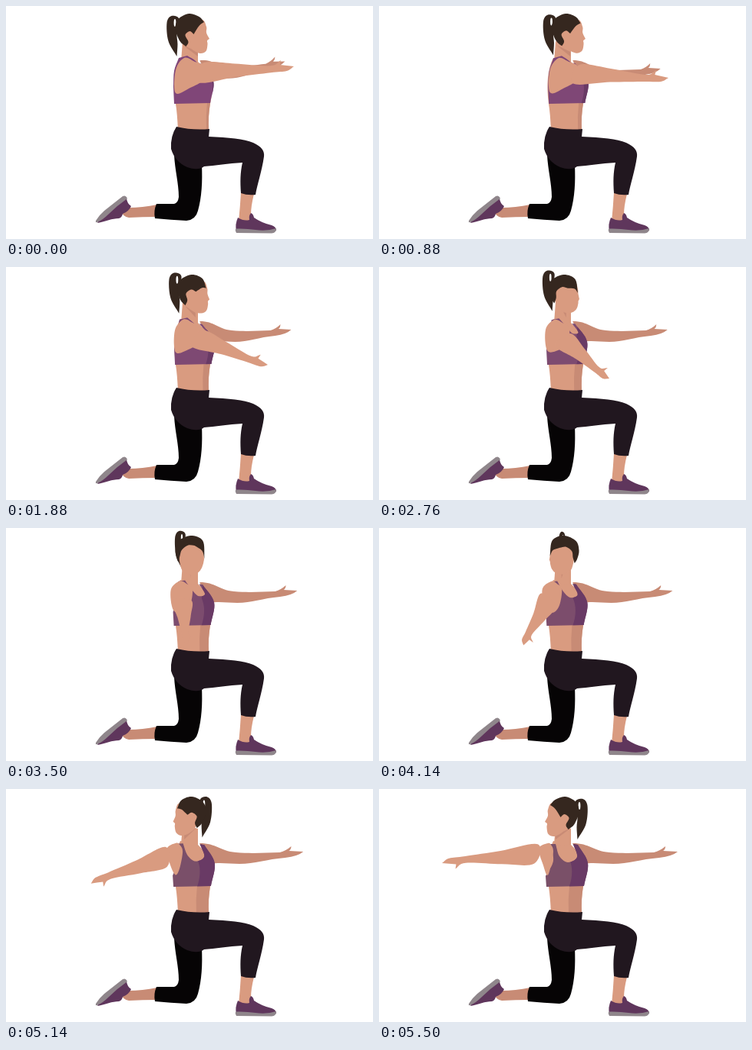
An HTML page that plays this animation: 478 by 305 pixels, repeating every 6.94 s.

```html
<!DOCTYPE html>
<html lang="en">
<head>
<meta charset="utf-8">
<title>Kneeling torso rotation</title>
<style>
html, body { margin: 0; width: 100%; height: 100%; overflow: hidden; background: #fff; }
svg { display: block; width: 100%; height: 100%; }
.skin { fill: #d99b80; }
.shade { fill: #c88b75; }
.hair { fill: #35271f; }
.shoe { fill: #5f365c; }
.sole { fill: #8f868b; }
</style>
</head>
<body>
<svg viewBox="0 0 478 305">
  <clipPath id="braClip"><use href="#bra"/></clipPath>

  <path class="shade" d="M197 260Q177 264 160 264L150 268Q152 276 160 277Q178 276 196 276Z"/>
  <path class="shoe" d="M157 252Q158 259 163 262Q160 269 152 272Q151 277 147 278C138 278 130 282 119 284C125 272 140 258 157 252Z"/>
  <path class="sole" d="M117 281Q121 274 128 268L152 249Q156 247 158 252Q145 261 133 273Q126 280 119 283Q116 284 117 281Z"/>
  <path fill="#060405" d="M219 195C220 215 225 232 225 250Q224 258 219 259L196 259Q192 268 194 278Q215 280 235 281Q247 280 250 268C255 250 256 230 255 208Z"/>
  <path class="skin" d="M306 244L323 246Q319 262 319 273L317 284L303 282Q305 262 306 244Z"/>
  <path class="shoe" d="M302 277Q310 282 317 280Q316 274 319 271Q322 272 323 277Q333 284 346 287Q352 289 352 294L300 294Q298 286 302 277Z"/>
  <path class="sole" d="M299 291.500Q313 291 325 293Q340 295 352 291Q352 297 346 297.500L300 297Q298 294 299 291.500Z"/>

  <path id="farArm" class="shade" d="M252 71C275 71 278 81 300 83C325 85 340 83 358 83Q366 81 373 75Q373 79 370 81L389 82Q382 88 365 90C340 92 325 98 305 98C290 98 280 96 266 98Z"/>
  <path id="torso" class="skin" d="M227 68L249 72Q262 84 269 98Q269 114 266 128Q263 145 264 163H224Q223 140 221 128Q216 90 227 68Z"/>
  <path id="waist" class="shade"/>
  <path id="pony" class="hair"/>
  <ellipse id="gap" fill="#fff" ry="5"/>
  <path class="skin" d="M230 46L250 52V74L228 73Z"/>
  <path id="neckShade" class="shade"/>
  <path id="face" class="skin"/>
  <path id="hair" class="hair"/>
  <path id="bra"/>
  <path id="braShade" fill="#693a65" clip-path="url(#braClip)"/>
  <path id="shoulder" class="skin"/>
  <path id="nearArm" class="skin"/>
  <path fill="#21171f" d="M222 158Q243 163 265 161L264 171C290 172 310 174 322 179C333 184 337 190 336 197C333 218 327 234 325 247Q314 248 306 245C305 230 305 218 308 205C290 206 272 209 258 210Q250 216 236 211Q220 204 215 187Q214 170 222 158Z"/>
</svg>
<script>
const LOOP = 6940, BEGIN = 200, END = 5500, STEP = 20;
const $ = id => document.getElementById(id);
const nums = s => s.split(/[ ,]+/).map(Number);
const mix = (a, b, k) => a.map((v, i) => v + (b[i] - v) * k);
const place = (v, dx, flip = 1, dy = 0) => v.map((n, i) => i % 2 ? n + dy : n * flip + dx);

// Head outlines, x measured from the head's middle, looking right.
const faceSide = nums('14,18 20.5,27 20.5,35 24.5,43 21.5,45.5 22,50 20,59 12,62 1,56 -6,46 -6,32');
const hairSide = nums('-6,53 -14,46 -20,30 -16,17 -2,10 11,14 17.5,21 11,26 4,37 -1,33 -7,38 -3,47');
const hairFront = nums('-17,44 -19,38 -20,29 -16,17 0,10 16,17 18,42 15,30 5,22 -4,22 -12,28 -15,36');
const ponytail = nums('9,17 -1,13 -7,22 -5,46 6,66 7,50 6,36');

// The front view of the face is an oval; each side point slides onto it.
const faceFront = faceSide.map((n, i, v) => {
  const a = Math.atan2((v[i | 1] - 38) / 24, v[i & ~1] / 17);
  return i % 2 ? 38 + 24 * Math.sin(a) : 17 * Math.cos(a);
});

// Upper body at the start and at the end of the turn.
const braSide = nums('219,128 218,106 219,85 225,68 236,65 247,72 254,82 260,84 250,75 253,75 270,98 266,127');
const braOpen = nums('218,128 217,114 227,94 223,72 230,72 235,88 246,96 258,89 253,72 259,73 272,97 267,127');
const shoulderSide = nums('232,68 246,73 258,79 256,97 240,107 221,114 221,84');
const shoulderOpen = nums('220,71 224,73 227,82 223,104 219,113 214,100 208,78');

// Arm outline: share of the arm's length, then distance towards the thumb side.
const armShape = nums('.15,11 .45,8 .78,2.5 .88,9 .87,3 1,0 .93,-5.5 .78,-6.5 .45,-9.5 .1,-14');
const handTimes = [200, 880, 1880, 2760, 3500, 4720, 5500];
const handPath = [[375, 79], [377, 94], [341, 128], [300, 146], [237, 152], [144, 155], [82, 97]];

function handAt(t) {
  let i = 0;
  while (i < 5 && t >= handTimes[i + 1]) i++;
  return mix(handPath[i], handPath[i + 1], (t - handTimes[i]) / (handTimes[i + 1] - handTimes[i]));
}

function arm([sx, sy], [hx, hy]) {
  const dx = hx - sx, dy = hy - sy, len = Math.hypot(dx, dy);
  return armShape.map((n, i, v) => {
    const f = v[i & ~1], w = v[i | 1] / len;
    return i % 2 ? sy + dy * f - dx * w : sx + dx * f + dy * w;
  });
}

// Closed spline through the points, with straight tangents at corners.
function outline(id, v, corners) {
  const n = v.length / 2;
  const at = i => { const k = (i + n) % n; return [v[2 * k], v[2 * k + 1]]; };
  const sharp = i => corners.includes(i % n);
  let d = `M${at(0)}`;
  for (let i = 0; i < n; i++) {
    const a = at(i), b = at(i + 1), prev = at(i - 1), next = at(i + 2);
    const c1 = a.map((x, k) => x + (sharp(i) ? (b[k] - x) / 3 : (b[k] - prev[k]) / 6));
    const c2 = b.map((x, k) => x - (sharp(i + 1) ? (x - a[k]) / 3 : (next[k] - a[k]) / 6));
    d += `C${c1} ${c2} ${b}`;
  }
  $(id).setAttribute('d', d + 'Z');
}

function drawHead(u, lean) {
  const x = 240.5 + lean;
  const yaw = 1 - 2 * u ** 1.6, side = Math.abs(yaw), flip = yaw < 0 ? -1 : 1;
  outline('face', place(mix(faceFront, faceSide, side), x, flip), [3]);
  outline('hair', place(mix(hairFront, hairSide, side), x, flip), [0, 6, 8]);
  $('neckShade').setAttribute('d', `M${240 - 10 * yaw} 51L${240 + 10 * yaw} 60V66Z`);

  // The ponytail swings round behind the head, rising on the way.
  const swing = Math.cos(Math.PI * u ** 2.6), curl = Math.cbrt(swing);
  const lift = 9 * Math.sin(Math.PI * u ** 1.4), px = x - 24 * swing;
  outline('pony', place(ponytail, px, curl, -lift), [4]);
  $('gap').setAttribute('cx', px + 3.5 * curl);
  $('gap').setAttribute('cy', 22 - lift);
  $('gap').setAttribute('rx', 1.4 * Math.abs(curl));
}

function drawBody(t, u, lean) {
  const open = u ** 1.5, shift = lean / 2;
  outline('bra', place(mix(braSide, braOpen, open), shift), [0, 1, 3, 4, 8, 9, 11]);
  outline('shoulder', place(mix(shoulderSide, shoulderOpen, open), shift), []);
  outline('nearArm', arm([236 - 14 * open + lean, 87 - 2 * open], handAt(t)), [3, 4, 5]);
  $('bra').setAttribute('fill', `rgb(${mix([128, 70, 120], [122, 80, 104], u).map(Math.round)})`);

  const e = 265 - 18 * u, w = 262 - 14 * u;
  $('braShade').setAttribute('d', `M${e} 130Q${e + 8} 108 ${e + 1} 92L${e + 3} 68H290V130Z`);
  $('waist').setAttribute('d', `M${w} 126H266Q263 145 264 163H${w - 1}Q${w - 2} 145 ${w} 126Z`);

  // The far arm drops a little at first, then keeps reaching out.
  const raise = Math.max(0, 1 - 8 * u);
  $('farArm').setAttribute('transform',
    `translate(254 85) skewY(${-5 * raise}) scale(${0.81 + 0.19 * u} 1) translate(-254 -85)`);
}

function draw(t) {
  const u = Math.min(1, Math.max(0, (t - BEGIN) / (END - BEGIN)));
  const lean = 80 * u * (1 - u) ** 6;
  drawHead(u, lean);
  drawBody(BEGIN + u * (END - BEGIN), u, lean);
}

const start = performance.now();
function tick() {
  const t = (performance.now() - start) % LOOP;
  draw(Math.floor(t / STEP) * STEP);
  requestAnimationFrame(tick);
}
tick();
</script>
</body>
</html>
```
